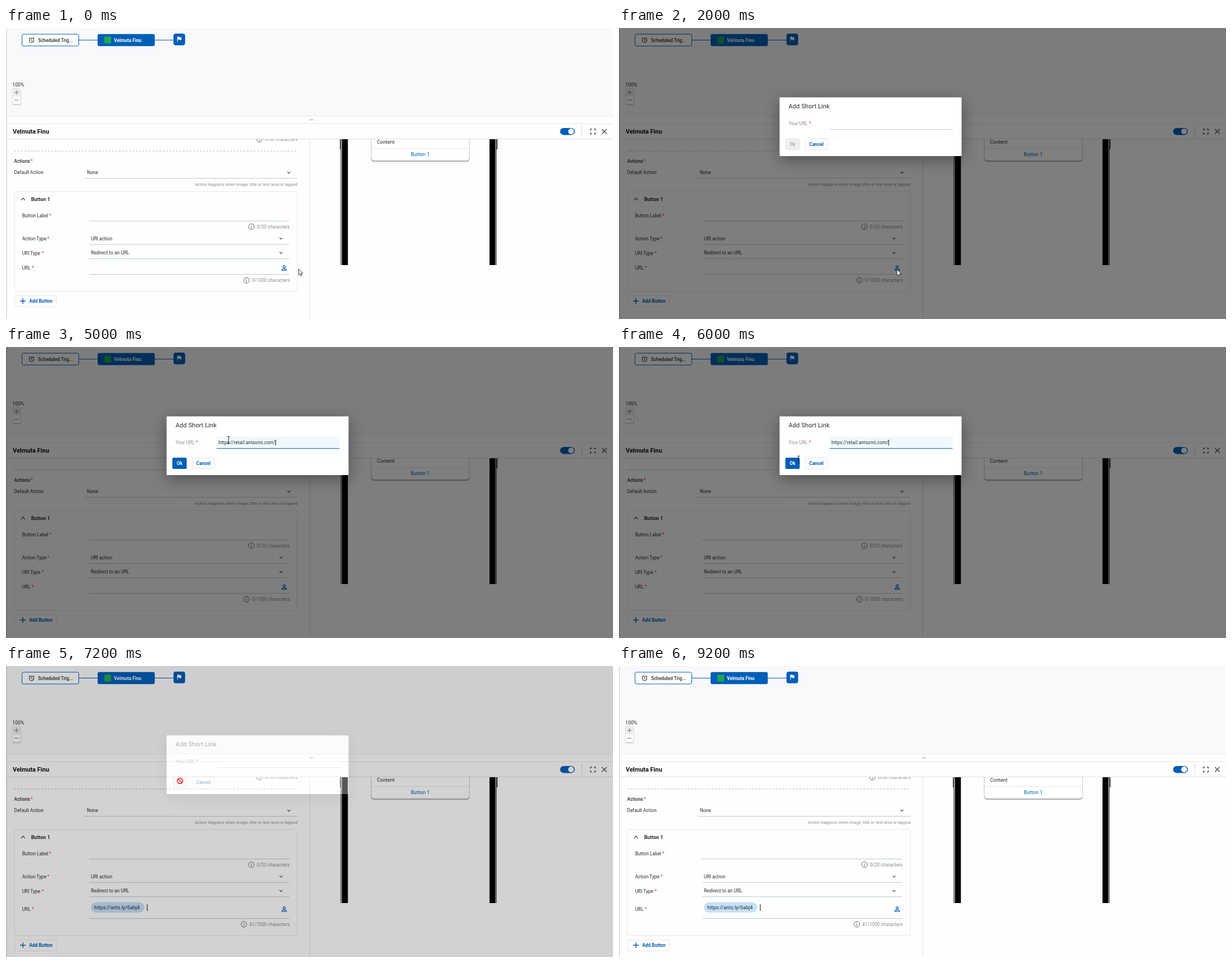
An HTML page for the animation above (9.8 s loop, 1080 by 518 pixels).

```html
<!DOCTYPE html>
<html lang="en">
<head>
<meta charset="utf-8">
<title>Add a short link</title>
<style>
html, body { margin: 0; width: 100%; height: 100%; overflow: hidden; background: #fefefe; }
svg { display: block; width: 1080px; height: 518px; }
text { font-family: Roboto, "Open Sans", sans-serif; white-space: pre; }
#paper { filter: drop-shadow(0 7px 14px rgba(0, 0, 0, .36)); }
</style>
</head>
<body>
<svg id="stage" viewBox="0 0 1080 518" xmlns="http://www.w3.org/2000/svg"></svg>
<script>
const BLUE = '#005eb8', INK = '#2b2b2b', GREY = '#8c8c8c', RULE = '#b6cdd9', EDGE = '#e6e6e9';
const BRAND = 'Velmuta Finu';
const LOOP = 9800, TICK = 200;

// ---- drawing helpers ----
const text = (x, cy, str, o = {}) =>
  `<text x="${x}" y="${cy}" dy=".35em" font-size="${o.size || 8.27}" fill="${o.fill || INK}" ` +
  `font-weight="${o.weight || 400}" text-anchor="${o.anchor || 'start'}" letter-spacing="${o.gap || 0}">${str}</text>`;
const rect = (x, y, w, h, fill, more = '') =>
  `<rect x="${x}" y="${y}" width="${w}" height="${h}" fill="${fill}" ${more}/>`;
const path = (d, stroke, w = 1, more = '') =>
  `<path d="${d}" fill="none" stroke="${stroke}" stroke-width="${w}" ${more}/>`;
const group = (id, body, more = '') => `<g id="${id}" ${more}>${body}</g>`;
const rule = (x1, x2, y, color = RULE) => path(`M${x1} ${y}H${x2}`, color);
const label = (x, cy, str, starX, o) => text(x, cy, str, o) + text(starX, cy, '*', { fill: '#e0342b' });
const chevron = (x, y, up) =>
  path(up ? `M${x - 3.5} ${y + 2}L${x} ${y - 1.8}L${x + 3.5} ${y + 2}` : `M${x - 2.5} ${y - 1.2}L${x} ${y + 1.4}L${x + 2.5} ${y - 1.2}`,
    '#4a4a4a', up ? 1.3 : 1.1);
const counter = (x, cy, str) =>
  `<circle cx="${x}" cy="${cy}" r="5" fill="none" stroke="#666" stroke-width="1"/>` +
  path(`M${x} ${cy - .6}V${cy + 2.7}M${x} ${cy - 2.7}V${cy - 1.5}`, '#666', 1.1) +
  text(x + 9.5, cy + .3, str, { fill: GREY });
const person = (x, y) =>
  `<circle cx="${x}" cy="${y - 2.2}" r="2" fill="none" stroke="${BLUE}" stroke-width="1.2"/>` +
  path(`M${x - 4} ${y + 4}V${y + 2.8}Q${x - 3.4} ${y + 1.4} ${x} ${y + 1.4}T${x + 4} ${y + 2.8}V${y + 4}Z`, BLUE, 1.2);
const addButton = y =>
  rect(15.5, y - 9.5, 74, 19.5, '#fff', `rx="2" stroke="${EDGE}"`) +
  path(`M25 ${y}H35M30 ${y - 5}V${y + 5}`, BLUE, 1.4) +
  text(41.3, y + .2, 'Add Button', { fill: BLUE, weight: 700 });

// ---- page ----
const canvasArea =
  rect(0, 0, 1080, 157, '#f9f9fc') +
  path('M129 21.5H164M264 21.5H299', BLUE) +
  rect(28.5, 11, 101, 21, '#fff', `rx="3" stroke="${BLUE}"`) +
  `<circle cx="45.5" cy="22" r="4" fill="none" stroke="${INK}" stroke-width="1.1"/>` +
  path('M45.5 19.6V22.3L47.4 23.4M40.8 18.9L43 17M50.2 18.9L48 17', INK) +
  text(57, 21.8, 'Scheduled Trig...', { weight: 500 }) +
  rect(163, 10.7, 101.7, 21.6, BLUE, 'rx="3"') +
  rect(175, 15.5, 12, 12, '#1fa84f') +
  text(192, 21.8, BRAND, { weight: 700, fill: '#fff' }) +
  rect(298, 10, 20.7, 20.7, BLUE, 'rx="4"') +
  '<path d="M304.6 15.6H308.6L309 16.6H312V21.4H308.8L308.4 20.4H305.6V24.4H304.6Z" fill="#fff"/>' +
  text(11.3, 100.8, '100%', { size: 8.7 }) +
  rect(11.5, 108, 15, 29.5, '#000', 'rx="2" opacity=".16"') +
  rect(11.5, 107.5, 14.5, 28, '#fff', 'rx="2" stroke="#dcdcdf" stroke-width=".8"') +
  rect(11.5, 107.5, 14.5, 14, '#ececee', 'rx="1"') +
  path('M14.8 114.7H22.6M18.7 110.8V118.6M14.8 128.4H22.6', '#777');

const header =
  rule(0, 1080, 156.8, '#ececef') + rule(0, 1080, 170.3, '#e6e6e9') + rule(0, 1080, 197.4, '#dedee2') +
  path('M540.5 163.5H546', '#555', 1.2, 'stroke-dasharray="1.3 .8"') +
  text(12, 184.2, BRAND, { size: 10.95, weight: 700, fill: '#111' }) +
  rect(986, 178, 26, 12.4, BLUE, 'rx="6.2"') +
  '<circle cx="1005.4" cy="184.2" r="5.1" fill="#fff"/>' +
  path('M1024.3 175.5V193', '#999', 1, 'stroke-dasharray="1.5 2.5"') +
  path('M1040 182.5V180H1042.5M1046 180H1048.5V182.5M1048.5 186V188.5H1046M1042.5 188.5H1040V186', '#555', 1.5) +
  path('M1060.3 180L1068.8 188.5M1068.8 180L1060.3 188.5', '#555', 1.5);

const form =
  counter(451, 197.9, '0/60 characters') +
  path('M15 219H517', '#aaa', 1, 'stroke-dasharray="2.7 3.3"') +
  label(14.5, 236.8, 'Actions', 44, { weight: 500 }) +
  text(14.5, 257.5, 'Default Action') + text(144, 257.5, 'None') +
  chevron(503.3, 257.2) + rule(140, 518, 267.5) +
  text(518.7, 278.2, 'Action happens when image, title or text area is tapped', { size: 7.53, fill: GREY, anchor: 'end' }) +
  `<rect id="box" x="15" y="291.3" width="503.5" height="177.7" fill="none" stroke="${EDGE}" rx="2"/>` +
  chevron(30.3, 304.6, true) + text(44.7, 304.7, 'Button 1', { size: 8.9, weight: 700 }) +
  label(28.7, 333.8, 'Button Label', 77, {}) + rule(148, 504, 343.5) +
  counter(436.7, 353.6, '0/20 characters') +
  label(28.7, 375.6, 'Action Type', 73.6, {}) + text(151, 375, 'URI action', { gap: .05 }) +
  chevron(489.3, 374.6) + rule(148, 504, 385.3) +
  label(28.7, 401.2, 'URI Type', 63.4, {}) + text(151, 400.4, 'Redirect to an URL', { gap: .03 }) +
  chevron(489.3, 400.2) + rule(148, 504, 410.7);

const emptyUrl = group('empty',
  label(28.7, 427.3, 'URL', 46, {}) + rule(148, 504, 438.6) + person(495, 427.3) +
  counter(428, 449, '0/1000 characters') + addButton(486));

const filledUrl = group('filled',
  label(28.7, 433.4, 'URL', 46, {}) + rule(148, 504, 449.5) + person(495, 432.8) +
  rect(151, 420.4, 95, 18.6, '#c5e1f9', 'rx="9.3"') +
  text(157, 429.9, 'https://ants.ly/6abj4', { size: 8.95 }) +
  group('caret', path('M251.3 424V436', '#111')) +
  counter(423.2, 459.8, '41/1000 characters') + addButton(497));

const phone =
  path('M540.3 198V518', '#e2e2e6') +
  rect(595, 197, 4, 225, '#77747c') + rect(596.6, 197, 1, 225, '#b5b1b8') + rect(598, 197, 10.3, 225, '#000') +
  rect(594, 197, 1.5, 19, '#3c3a40') +
  rect(860.3, 197, 10.2, 225, '#000') + rect(870, 197, 3, 225, '#5a565f') + rect(871.2, 197, .8, 225, '#a5a0a8') +
  rect(872.8, 197, 1.7, 19, '#3c3a40') +
  rect(649.6, 185, 175.2, 53.2, '#b4b4b8', 'rx="5"') +
  rect(650, 185, 174.4, 51, '#fff', 'rx="5" stroke="#c4c4c8" stroke-width=".8"') +
  rule(650, 824, 214.5, '#e4e4e4') +
  text(660, 203, 'Content', { size: 8.95 }) +
  text(737, 225.2, 'Button 1', { size: 8.9, fill: BLUE, anchor: 'middle' });

// ---- dialog ----
const dialog = group('dialog',
  rect(0, 0, 1080, 518, '#000', 'opacity=".5"') +
  rect(285.7, 123.5, 323.8, 104.5, '#fff', 'id="paper" rx="1"') +
  text(301.8, 139.3, 'Add Short Link', { size: 10.96, gap: .1 }) +
  label(301.8, 170.5, 'Your URL', 338, { fill: GREY }) +
  group('focus', rect(374.7, 159.5, 218.8, 21, '#f1f8fd')) +
  `<path id="under" d="M374.7 180.6H593.5" stroke="${RULE}"/>` +
  group('typed', text(378, 170.3, 'https://retail.antsomi.com/', { gap: .08 })) +
  group('typeCaret', path('M0 165V175.5', '#111')) +
  group('okOff', rect(296.4, 197.2, 25, 19.6, '#efeff1', 'rx="2" stroke="#e2e2e4" stroke-width=".8"') +
    text(308.8, 207, 'Ok', { fill: '#a5a5a8', weight: 500, anchor: 'middle' })) +
  group('okOn', rect(296, 197, 25.5, 20, BLUE, 'rx="2"') +
    text(308.8, 207, 'Ok', { fill: '#fff', weight: 700, anchor: 'middle' })) +
  rect(331.8, 197.3, 39.2, 19.4, '#fff', 'rx="2" stroke="#dedee2" stroke-width=".8"') +
  text(351.2, 207, 'Cancel', { fill: BLUE, weight: 700, anchor: 'middle' }));

// ---- cursors, hot spot at 0,0 ----
const cursors = {
  arrow: '<path d="M0 0V10.8L2.5 8.5L4.2 12.4L6 11.6L4.3 7.8H7.6Z" fill="#fff" stroke="#222" stroke-width=".9"/>',
  hand: '<path d="M-1.2 1Q0-1 1.2 1V6Q2.6 5 3.4 6.4Q4.8 5.6 5.4 7Q7 6.6 7 8.2V11.4L5.6 15H-1L-4.2 9.8Q-4.6 7.6-2.6 8.4L-1.2 9.6Z" fill="#fff" stroke="#111" stroke-width="1"/>',
  beam: path('M-2.5-6H-.8L0-5.4L.8-6H2.5M0-5.4V5.4M-2.5 6H-.8L0 5.4L.8 6H2.5', '#222', 1),
  stop: '<circle r="4.7" fill="#fff" stroke="#e0201b" stroke-width="1.6"/>' + path('M-3.3-3.3L3.3 3.3', '#e0201b', 1.6)
};
const pointer = group('pointer', Object.entries(cursors).map(([k, body]) => group(k, body)).join(''));

document.getElementById('stage').innerHTML =
  '<clipPath id="below"><rect x="0" y="197.9" width="1080" height="321"/></clipPath>' +
  rect(0, 0, 1080, 518, '#fefefe') + canvasArea +
  group('body', form + emptyUrl + filledUrl + phone, 'clip-path="url(#below)"') +
  header + rect(0, 0, 1.6, 518, '#d9d9e2') + dialog + pointer;

// ---- timing ----
// [time, x, y, cursor]; position eases between rows, cursor kind holds
const moves = [
  [0, 520.7, 429, 'arrow'], [400, 520.7, 429, 'arrow'], [1000, 494.6, 430, 'hand'],
  [1800, 494.6, 430, 'arrow'], [2800, 494.6, 430, 'arrow'], [3800, 396, 165.3, 'beam'],
  [5200, 396, 165.3, 'beam'], [6200, 310.5, 204.2, 'hand'], [7200, 309.7, 204.5, 'stop'],
  [7400, 310.5, 205, 'arrow'], [7600, 310.5, 205, 'arrow'], [8200, 262, 422, 'arrow'],
  [8400, 262, 422, 'arrow'], [8800, 364, 214, 'arrow'], [9000, 354, 91, 'arrow'], [9200, 354, 91, '']
];
const OPEN = 1800, FOCUS = 4200, PASTE = 4600, BLUR = 6600, DONE = 7200, CLOSED = 7400;

const el = id => document.getElementById(id);
const show = (id, on) => { el(id).style.display = on ? '' : 'none'; };
const blink = (t, from) => (t - from) % 1000 < 500;

function cursorAt(t) {
  let i = moves.length - 1;
  while (moves[i][0] > t) i--;
  const a = moves[i], b = moves[i + 1] || a;
  const p = b === a ? 0 : (t - a[0]) / (b[0] - a[0]);
  const k = p * p * (3 - 2 * p);
  return { x: a[1] + (b[1] - a[1]) * k, y: a[2] + (b[2] - a[2]) * k, kind: a[3] };
}

function dialogFade(t) {
  if (t < OPEN || t >= CLOSED) return 0;
  if (t < OPEN + TICK) return .5;
  return t < DONE ? 1 : .34;
}

function render(t) {
  const done = t >= DONE, focused = t >= FOCUS && t < BLUR, pasted = t >= PASTE && t < DONE;
  show('empty', !done);
  show('filled', done);
  el('box').setAttribute('height', done ? 188.7 : 177.7);
  show('caret', done && blink(t, DONE));

  const fade = dialogFade(t);
  show('dialog', fade > 0);
  el('dialog').style.opacity = fade;
  show('focus', focused);
  el('under').setAttribute('stroke', focused ? BLUE : RULE);
  show('typed', pasted);
  show('typeCaret', focused && blink(t, pasted ? PASTE : FOCUS));
  el('typeCaret').setAttribute('transform', `translate(${pasted ? 479.8 : 378.3} 0)`);
  show('okOn', pasted);
  show('okOff', !pasted);

  const c = cursorAt(t);
  el('pointer').setAttribute('transform', `translate(${c.x} ${c.y})`);
  for (const k in cursors) show(k, k === c.kind);
}

const start = performance.now();
function loop() {
  const t = (performance.now() - start) % LOOP;
  render(Math.floor(t / TICK) * TICK);
  requestAnimationFrame(loop);
}
render(0);
requestAnimationFrame(loop);
</script>
</body>
</html>
```
